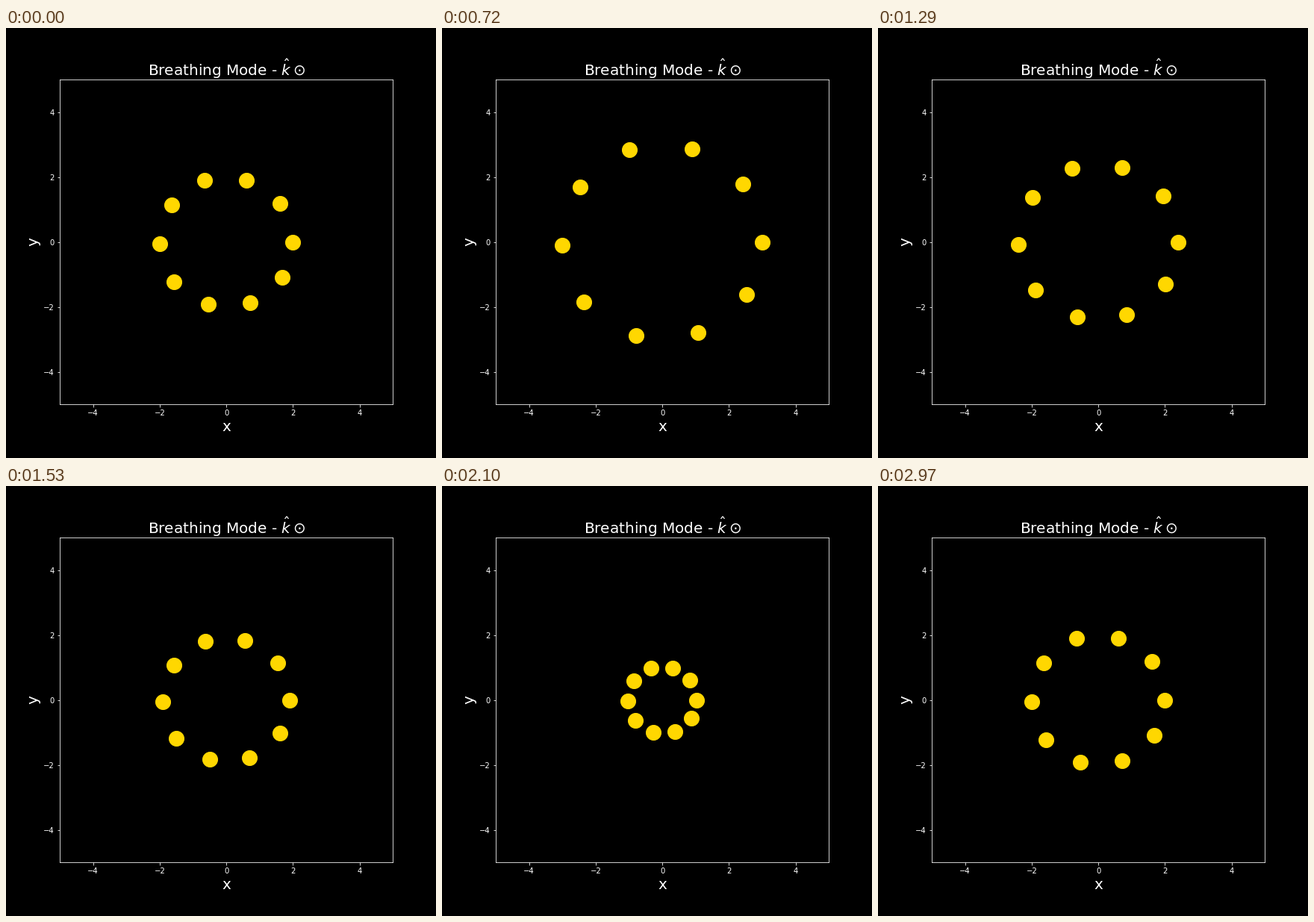
These frames come from a looping animation (576 by 576 pixels, 3000 ms). A matplotlib script:

```python
import numpy as np
import matplotlib.pyplot as plt
from matplotlib.animation import FuncAnimation

FRAMES = 100
INTERVAL = 30  # ms

plt.style.use("dark_background")

phase = np.linspace(0, 2 * np.pi, FRAMES)
theta = phase[::10]  # ten particles, slightly uneven at the seam

fig, ax = plt.subplots(figsize=(8, 8), dpi=72)
fig.subplots_adjust(bottom=0.125)
ax.set_xlim(-5, 5)
ax.set_ylim(-5, 5)
ax.set_title(r"Breathing Mode - $\hat{k} \odot$", fontsize=20)
ax.set_xlabel("x", fontsize=20)
ax.set_ylabel("y", fontsize=20)
ring, = ax.plot([], [], "o", color="gold", markersize=20)


def update(i):
    radius = 2 + np.sin(phase[i])
    ring.set_data(radius * np.cos(theta), radius * np.sin(theta))
    return ring,


anim = FuncAnimation(fig, update, frames=FRAMES, interval=INTERVAL,
                     repeat=True, repeat_delay=0)
plt.show()
```
